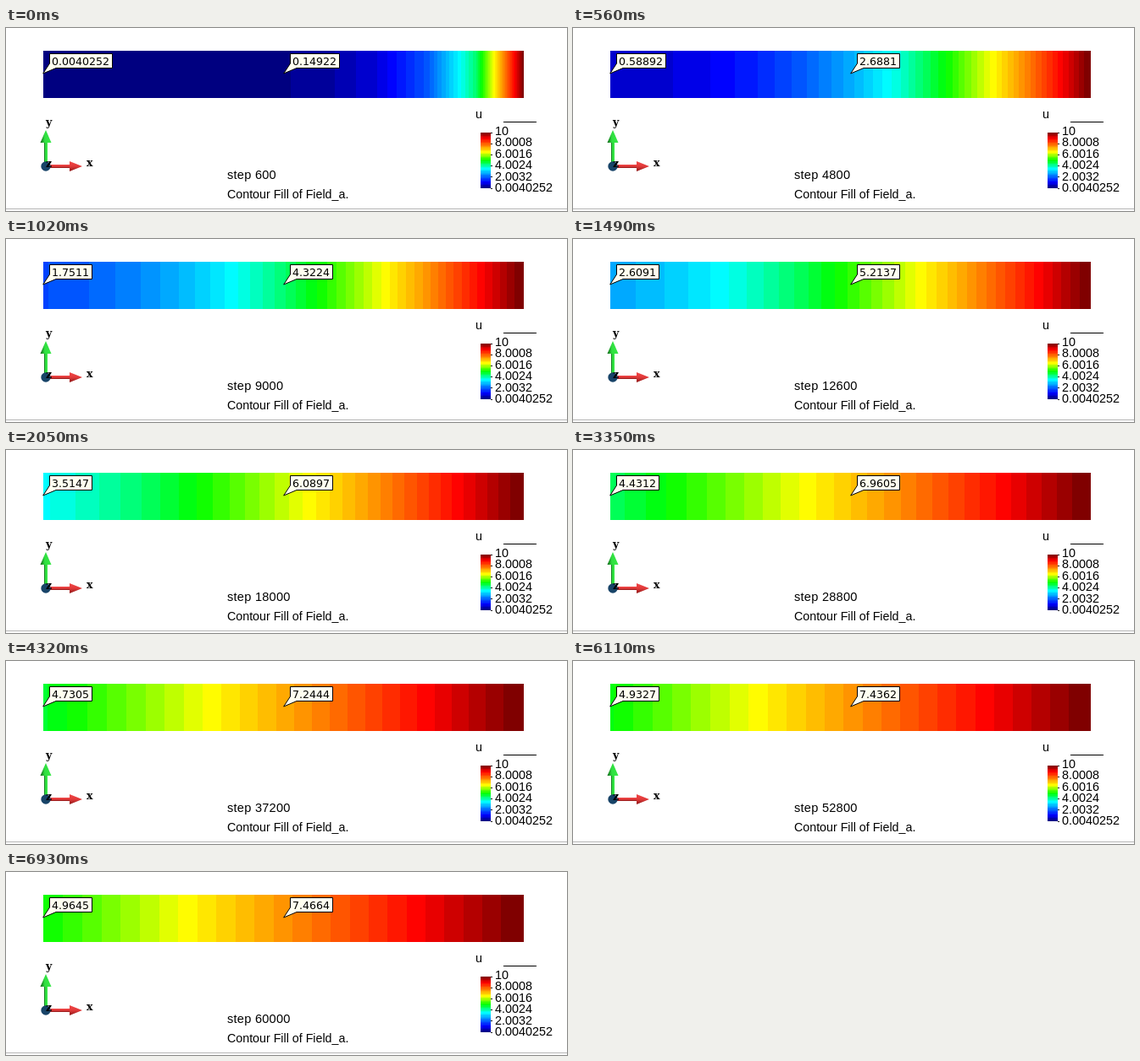
Animation of 662 by 217 pixels, one loop 8.12 s. Source, as an HTML page:

```html
<!DOCTYPE html>
<html lang="en">
<head>
<meta charset="utf-8">
<title>Contour Fill of Field_a</title>
<style>
html, body { margin: 0; width: 100%; height: 100%; overflow: hidden; background: #fff; }
svg { display: block; width: 662px; height: 217px; }
text { white-space: pre; fill: #000; }
.sans { font-family: "Liberation Sans", Arial, sans-serif; font-size: 14.4px; }
.axis { font: bold 12.5px "DejaVu Serif", "Noto Serif", serif; }
.tag { font-family: "DejaVu Sans", Verdana, sans-serif; font-size: 12.6px; }
</style>
</head>
<body>
<svg viewBox="0 0 662 217">
  <defs>
    <linearGradient id="green">
      <stop offset="0" stop-color="#0c5a14"/><stop offset=".4" stop-color="#2fe040"/><stop offset="1" stop-color="#35e845"/>
    </linearGradient>
    <linearGradient id="red" x2="0" y2="1">
      <stop offset="0" stop-color="#f04848"/><stop offset=".5" stop-color="#e23a3a"/><stop offset="1" stop-color="#8c1818"/>
    </linearGradient>
  </defs>
  <rect width="662" height="217" fill="#fff"/>
  <g id="bar" shape-rendering="crispEdges"></g>
  <g id="tags"></g>

  <rect x="45" y="134" width="4" height="28" fill="url(#green)"/>
  <path d="M47 121L53.5 136H40.5Z" fill="url(#green)"/>
  <rect x="50" y="162" width="27" height="4" fill="url(#red)"/>
  <path d="M90 164L75 158V170Z" fill="url(#red)"/>
  <circle cx="47" cy="164" r="5.7" fill="#184468"/>
  <text class="axis" x="47" y="116">y</text>
  <text class="axis" x="95" y="164">x</text>
  <text class="axis" x="47" y="165">z</text>

  <text class="sans" id="step" x="261" y="179" style="font-size:14.6px; letter-spacing:.25px"></text>
  <text class="sans" x="261" y="202" style="font-size:14.25px">Contour Fill of Field_a.</text>
  <text class="sans" x="554" y="107">u</text>
  <rect x="587" y="111" width="39" height="1" fill="#000"/>
  <g id="legend" shape-rendering="crispEdges"></g>
  <rect y="214" width="662" height="1" fill="#b4b4b4"/>
</svg>
<script>
const LOOP = 8120, STEPS = 100, STEP = 600, BANDS = 50;
const LOW = 0.0040252, HIGH = 10;
const LEFT = 44, WIDTH = 567, CELLS = 10;

// [time, index] knots; each index between them is shown in turn
const KNOTS = [[0, 0], [130, 1], [900, 12], [950, 13], [1020, 14], [1100, 15], [1710, 24],
  [1780, 25], [2050, 29], [2180, 30], [2580, 36], [2650, 37], [3350, 47], [3400, 48],
  [3470, 49], [4250, 60], [4320, 61], [4370, 62], [5130, 73], [5200, 74], [5970, 85],
  [6040, 86], [6110, 87], [6180, 88], [6810, 97], [6880, 98], [6930, 99]];

const $ = id => document.getElementById(id);

function add(parent, tag, attrs, text) {
  const el = document.createElementNS("http://www.w3.org/2000/svg", tag);
  for (const k in attrs) el.setAttribute(k, attrs[k]);
  if (text) el.textContent = text;
  return parent.appendChild(el);
}

const digits = v => String(+v.toPrecision(5));

// Implicit diffusion: u' = u at the left end, u = 10 at the right end
function solve() {
  const h = 1 / CELLS, d = 1 / 75, g = d / h;
  let u = Array(CELLS + 1).fill(0);
  u[CELLS] = HIGH;
  const all = [];
  for (let n = 0; n < STEPS; n++) {
    const c = [], r = [], next = [];
    for (let i = 0; i < CELLS; i++) {
      const mass = i ? h : h / 2;
      const diag = i ? mass + 2 * g - g * c[i - 1] : mass + g + d;
      c[i] = g / diag;
      r[i] = (mass * u[i] + (i ? g * r[i - 1] : 0)) / diag;
    }
    next[CELLS] = HIGH;
    for (let i = CELLS - 1; i >= 0; i--) next[i] = r[i] + c[i] * next[i + 1];
    all.push(u = next);
  }
  return all;
}

const STOPS = [[0, 0, 0, 128], [.1, 0, 0, 255], [.35, 0, 255, 255], [.5, 0, 255, 0],
  [.65, 255, 255, 0], [.9, 255, 0, 0], [1, 128, 0, 0]];

function colour(k) {
  const t = k / (BANDS - 1);
  const i = Math.max(1, STOPS.findIndex(s => s[0] >= t));
  const a = STOPS[i - 1], b = STOPS[i], f = (t - a[0]) / (b[0] - a[0]);
  return `rgb(${[1, 2, 3].map(j => Math.round(a[j] + (b[j] - a[j]) * f))})`;
}

// Lower limit of a colour band
const limit = k => LOW + (HIGH - LOW) * (.01997 * k - .0026);

// Where the profile reaches value v, in pixels
function cross(u, v) {
  if (v <= u[0]) return LEFT;
  let i = 0;
  while (i < CELLS - 1 && u[i + 1] < v) i++;
  return LEFT + WIDTH * (i + (v - u[i]) / (u[i + 1] - u[i])) / CELLS;
}

function makeTag(x) {
  const path = add($("tags"), "path", { fill: "#fffff0", stroke: "#000", "stroke-width": 1 });
  const label = add($("tags"), "text", { class: "tag", x: x + 10, y: 44 });
  return v => {
    const s = digits(v), w = 8 * (s.length - 1) + 10;
    label.textContent = s;
    path.setAttribute("d", `M${x - .3} 54L${x + 7.5} 42V30.5h${w}v17H${x + 15}Z`);
  };
}

const fields = solve();
const bands = [];
for (let k = 0; k < BANDS; k++) {
  bands.push(add($("bar"), "rect", { y: 27, height: 56, fill: colour(k) }));
  const top = 190 - 66 * (k + 1) / BANDS;
  add($("legend"), "rect", { x: 560, y: top, width: 12, height: 190 - 66 * k / BANDS - top, fill: colour(k) });
}
for (let i = 0; i <= 5; i++) {
  const v = HIGH - (HIGH - LOW) * i / 5;
  add($("legend"), "rect", { x: 572, y: Math.round(124 + 13.1 * i), width: 2, height: 1, fill: "#000" });
  add($("legend"), "text", { class: "sans", x: 577, y: 127 + 13.4 * i }, digits(v));
}
const tags = [makeTag(44), makeTag(328)];

function indexAt(t) {
  let i = KNOTS.length - 1;
  while (KNOTS[i][0] > t) i--;
  if (i === KNOTS.length - 1) return KNOTS[i][1];
  const [t0, n0] = KNOTS[i], [t1, n1] = KNOTS[i + 1];
  return n0 + Math.floor((t - t0) / (t1 - t0) * (n1 - n0) + 1e-6);
}

let shown = -1;
function draw(n) {
  if (n === shown) return;
  shown = n;
  const u = fields[n];
  bands.forEach((el, k) => {
    const x = k ? cross(u, limit(k)) : LEFT;
    el.setAttribute("x", x);
    el.setAttribute("width", LEFT + WIDTH - x);
  });
  tags[0](u[0]);
  tags[1](u[CELLS / 2]);
  $("step").textContent = "step " + (n + 1) * STEP;
}

const start = performance.now();
function tick() {
  draw(indexAt((performance.now() - start) % LOOP));
  requestAnimationFrame(tick);
}
tick();
</script>
</body>
</html>
```
